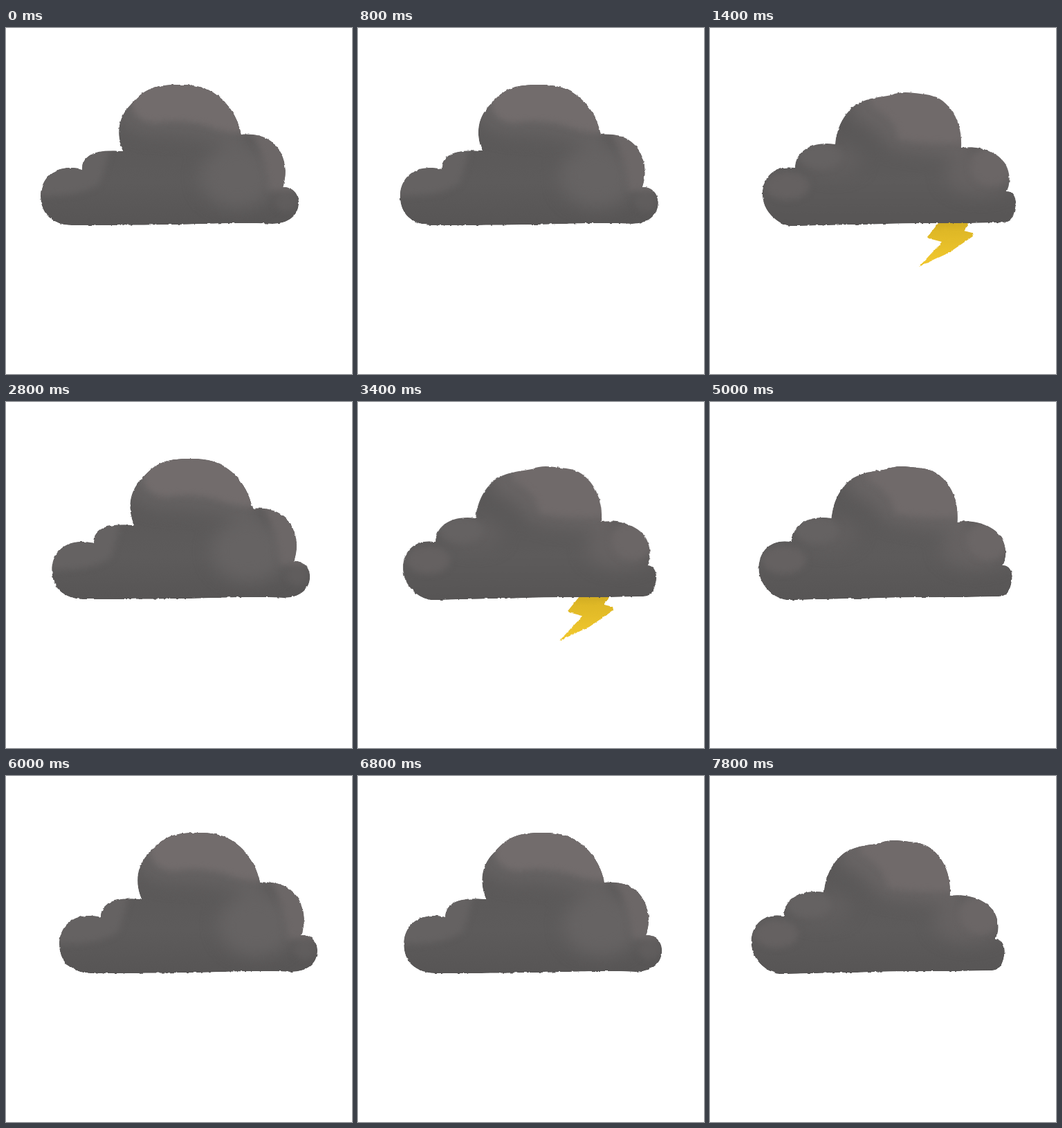
Write an HTML page that moves like this. It is 500 by 500 pixels and loops after 8.01 s.

```html
<!DOCTYPE html>
<html lang="en">
<head>
<meta charset="utf-8">
<title>Storm cloud</title>
<style>
html, body { margin: 0; width: 100%; height: 100%; overflow: hidden; background: #fff; }
svg { display: block; width: 100%; height: 100%; }
</style>
</head>
<body>
<svg viewBox="0 0 500 500">
  <defs>
    <filter id="rough" filterUnits="userSpaceOnUse" x="0" y="0" width="500" height="500" color-interpolation-filters="sRGB">
      <feTurbulence id="noise" type="fractalNoise" baseFrequency=".16" numOctaves="2"/>
      <feDisplacementMap in="SourceGraphic" scale="3" xChannelSelector="R" yChannelSelector="G"/>
    </filter>
    <filter id="soft" filterUnits="userSpaceOnUse" x="0" y="0" width="500" height="500" color-interpolation-filters="sRGB">
      <feGaussianBlur stdDeviation="5"/>
    </filter>
    <filter id="haze" filterUnits="userSpaceOnUse" x="0" y="0" width="500" height="500" color-interpolation-filters="sRGB">
      <feGaussianBlur stdDeviation="12"/>
    </filter>
    <linearGradient id="base" gradientUnits="userSpaceOnUse" x1="0" y1="130" x2="0" y2="285">
      <stop offset="0" stop-color="#5a5858"/>
      <stop offset=".6" stop-color="#5d5b5b"/>
      <stop offset="1" stop-color="#575555"/>
    </linearGradient>
    <linearGradient id="gold" gradientUnits="userSpaceOnUse" x1="0" y1="280" x2="0" y2="335">
      <stop offset="0" stop-color="#d0ab22"/>
      <stop offset=".25" stop-color="#dfb826"/>
      <stop offset="1" stop-color="#efc62d"/>
    </linearGradient>
    <path id="highShape" d="M169 178C161 160 158 132 181 110C200 88 215 82 250 82C284 82 297 90 312 103C328 118 336 135 340 154C370 151 389 164 397 180C406 198 405 215 400 230C413 229 424 239 423 254C422 272 407 283 385 283C330 281 310 283 290 283C220 285 150 285 95 285C66 284 50 268 50 243C50 220 68 195 110 204C110 186 126 174 169 178Z"/>
    <path id="lowShape" d="M162 168C164 142 176 122 193 110C211 100 228 100 243 97C256 91 270 93 285 95C303 97 314 99 328 116C341 133 345 152 344 173C372 169 397 180 407 195C416 210 415 225 410 236C420 236 424 246 423 256C421 269 418 281 404 281C340 283 280 281 210 284C170 284 130 286 97 286C80 284 62 268 58 250C52 222 70 196 104 202C104 180 126 163 162 168Z"/>
    <clipPath id="highClip"><use href="#highShape"/></clipPath>
    <clipPath id="lowClip"><use href="#lowShape"/></clipPath>
  </defs>

  <g filter="url(#rough)"><g id="sky">
    <path id="bigBolt" fill="url(#gold)" d="M227 264L175 320L176 323L229 326L217 345L174 407L227 363L278 315L277 309L271 305L242 299L275 266Z"/>
    <path id="smallBolt" fill="url(#gold)" d="M324 266L295 302L297 304L316 309L310 316L283 345L326 325L361 301L360 296L348 293L361 272Z"/>

    <g id="high" clip-path="url(#highClip)">
      <use href="#highShape" fill="url(#base)"/>
      <g filter="url(#haze)">
        <ellipse fill="#666363" cx="335" cy="215" rx="55" ry="45"/>
        <path fill="#656262" d="M150 70H345V175Q290 160 240 155Q190 160 160 135Z"/>
      </g>
      <g filter="url(#soft)">
        <path fill="#726c6c" d="M175 75H345V152Q310 150 290 141Q250 130 215 137Q186 134 182 112Z"/>
        <path fill="#6c6767" d="M345 140Q375 175 380 235H425V140Z"/>
        <path fill="#656262" d="M105 170H150Q145 200 135 225Q105 245 45 242V190Z"/>
        <ellipse fill="#605d5d" cx="405" cy="250" rx="16" ry="15"/>
      </g>
    </g>

    <g id="low" clip-path="url(#lowClip)">
      <use href="#lowShape" fill="url(#base)"/>
      <g filter="url(#haze)">
        <path fill="#686464" d="M180 80H360V185Q290 185 240 172Q225 145 185 130Z"/>
        <ellipse fill="#666262" cx="370" cy="210" rx="50" ry="30"/>
        <ellipse fill="#625f5f" cx="160" cy="190" rx="40" ry="22"/>
      </g>
      <g filter="url(#soft)">
        <path fill="#706a6a" d="M215 85H350V166Q290 168 254 160Q252 132 215 112Z"/>
        <ellipse fill="#6b6666" cx="388" cy="200" rx="30" ry="28"/>
        <ellipse fill="#656262" cx="140" cy="185" rx="32" ry="19"/>
        <ellipse fill="#656161" cx="93" cy="228" rx="32" ry="20"/>
      </g>
    </g>
  </g></g>
</svg>
<script>
const STEP = 200, STEPS = 40, LOOP = 8010, CYCLE = 10, SWAY = 27;
const el = id => document.getElementById(id);
const show = (id, on) => el(id).style.display = on ? '' : 'none';
const move = (id, x, y) => el(id).setAttribute('transform', `translate(${x} ${y})`);
let last = -1;

function draw(step) {
  const phase = step % CYCLE;
  const sway = step % 20;
  const isHigh = phase < 5;
  move('sky', SWAY * Math.min(sway, 20 - sway) / 10, 0);
  show('high', isHigh);
  show('low', !isHigh);
  show('bigBolt', phase >= 1 && phase <= 3);
  show('smallBolt', phase >= 6 && phase <= 8);
  // Each bolt slides out from behind the cloud on its first step.
  move('bigBolt', 0, phase > 1 ? 8 : 0);
  move('smallBolt', 0, phase > 6 ? 0 : -8);
  el('noise').setAttribute('seed', step + 1);
}

function tick() {
  const step = Math.min(STEPS - 1, Math.floor(performance.now() % LOOP / STEP));
  if (step !== last) draw(last = step);
  requestAnimationFrame(tick);
}
tick();
</script>
</body>
</html>
```
